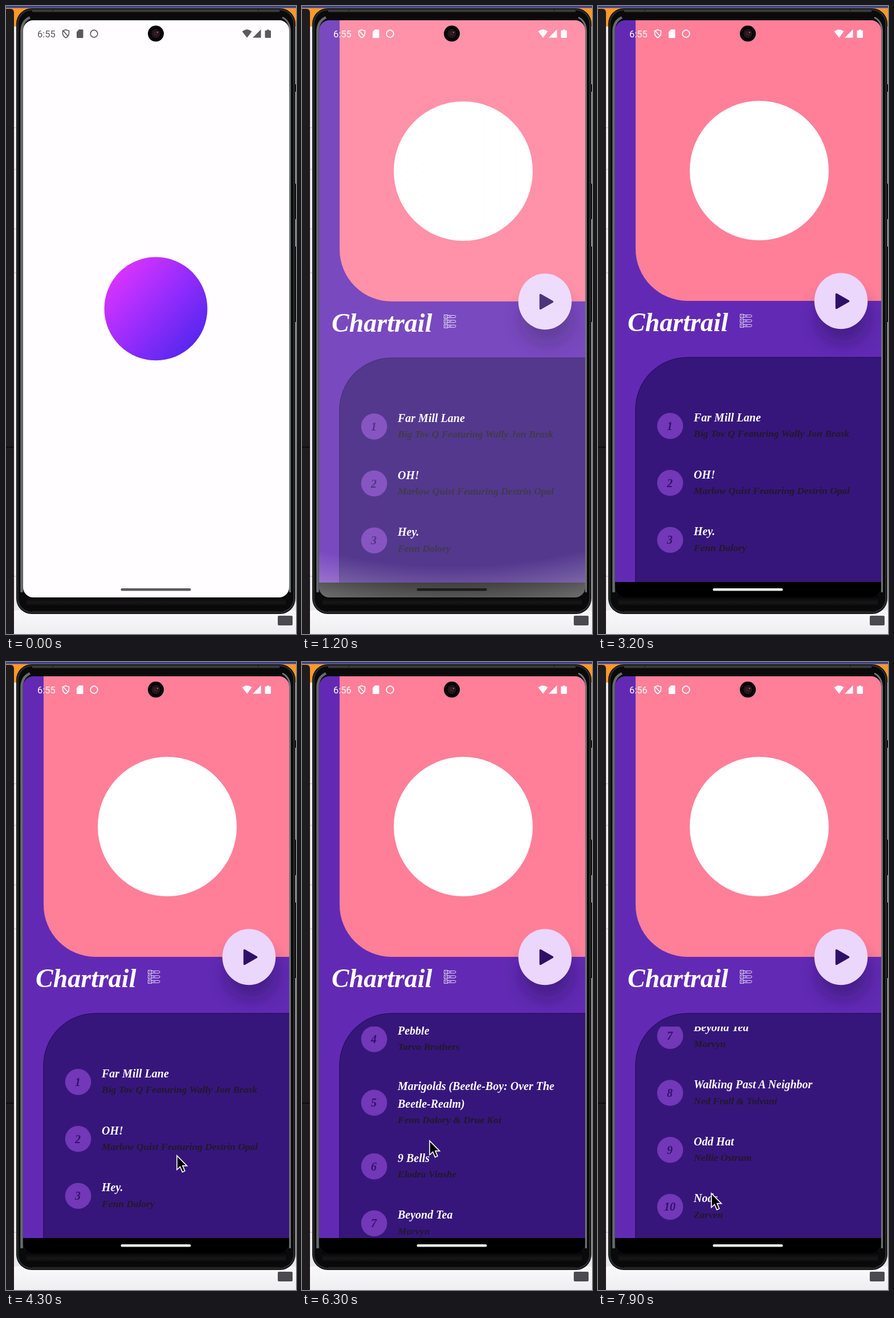
Write an HTML page that moves like this. It is 509 px wide and 1099 px high and loops after 8000 ms.

```html
<!DOCTYPE html>
<html lang="en">
<head>
<meta charset="utf-8">
<title>Song chart</title>
<style>
  html, body { margin: 0; width: 100%; height: 100%; overflow: hidden; background: #f4f4f7; }
  svg { display: block; width: 100%; height: 100%; }
  .script { font-family: "Liberation Serif", serif; font-weight: bold; font-style: italic; }
  .title { font-size: 20px; fill: #fff; }
  .artist { font-size: 17.5px; fill: #21182a; }
  .rank { font-size: 20px; fill: #340f70; text-anchor: middle; }
</style>
</head>
<body>
<svg viewBox="0 0 509 1099" preserveAspectRatio="none">
  <defs>
    <linearGradient id="disc" x1=".12" y1=".15" x2=".9" y2=".85">
      <stop offset="0" stop-color="#d933ff"/>
      <stop offset=".5" stop-color="#962cfc"/>
      <stop offset="1" stop-color="#5427ee"/>
    </linearGradient>
    <radialGradient id="reveal" gradientUnits="userSpaceOnUse" cx="263" cy="25" r="1">
      <stop id="inner" offset=".8" stop-color="#fffdff"/>
      <stop offset="1" stop-color="#fffdff"/>
    </radialGradient>
    <linearGradient id="desk" x1="0" y1="0" x2="0" y2="1">
      <stop offset="0" stop-color="#fafafc"/>
      <stop offset="1" stop-color="#eeeef2"/>
    </linearGradient>
    <linearGradient id="chin" x1="0" y1="0" x2="0" y2="1">
      <stop offset="0" stop-color="#020202"/>
      <stop offset=".6" stop-color="#171718"/>
      <stop offset="1" stop-color="#050505"/>
    </linearGradient>
    <filter id="soft" x="-80%" y="-80%" width="260%" height="260%">
      <feGaussianBlur stdDeviation="15"/>
    </filter>
    <clipPath id="screen"><rect x="30" y="25" width="467" height="1010" rx="18"/></clipPath>
    <clipPath id="window"><rect x="66" y="638" width="431" height="370"/></clipPath>
  </defs>

  <!-- desktop -->
  <rect width="509" height="1099" fill="#e9e9ec"/>
  <rect y="1058" width="509" height="41" fill="url(#desk)"/>
  <rect width="509" height="36" fill="#f79a2b"/>
  <rect width="509" height="3.5" fill="#38438f"/>
  <path d="M14 213h5M14 286h5M14 390h5M14 467h5M14 998h5" stroke="#b9b9bd"/>
  <path d="M0 5H8Q14 5 14 12V1099H0Z" fill="#1f1c20"/>
  <path d="M0 772H14" stroke="#0c0b0d" stroke-width="2"/>
  <rect x="477" y="1067" width="26" height="17" rx="2" fill="#4a4a50"/>

  <!-- phone body -->
  <rect x="505" y="137" width="4" height="13" fill="#141414"/>
  <rect x="505" y="311" width="4" height="62" fill="#141414"/>
  <rect x="505" y="421" width="4" height="132" fill="#141414"/>
  <rect x="18" y="4" width="490" height="1060" rx="27" fill="#0a0a0b"/>
  <rect x="20.5" y="6.5" width="485" height="1055" rx="25" fill="none" stroke="#2b2d2d" stroke-width="2.5"/>
  <path d="M46 8.500H480" stroke="#3a3b3c" stroke-width="4"/>
  <path d="M82 5v7M443 5v7" stroke="#1b1b1b"/>
  <path d="M27.500 1026V44Q28 26 42 20" fill="none" stroke="#676a6b" stroke-width="4.500"/>
  <path d="M498.500 1026V44Q498 26 485 20" fill="none" stroke="#6f7273" stroke-width="3"/>
  <rect x="36" y="1032" width="455" height="20" fill="url(#chin)"/>
  <path d="M46 1060.500H480" stroke="#252526" stroke-width="3"/>

  <g clip-path="url(#screen)">
    <rect x="30" y="25" width="467" height="1010" fill="#622ab4"/>
    <g id="app">
      <path d="M66 5H497V516H157A91 91 0 0 1 66 425Z" fill="#ff7f99"/>
      <circle cx="283" cy="288" r="122" fill="#fff"/>
      <ellipse cx="430" cy="546" rx="46" ry="45" fill="#260c58" opacity=".46" filter="url(#soft)"/>
      <ellipse cx="426.500" cy="516.200" rx="46.800" ry="49" fill="#ebd6fc"/>
      <path d="M418.500 504.500V528.500L439.500 516.500Z" fill="#2f1067" stroke="#2f1067" stroke-width="3.500" stroke-linejoin="round"/>
      <text class="script" x="52" y="569" font-size="46" fill="#fff">Chartrail</text>
      <g id="rows" fill="none" stroke="#e9defa"></g>
      <path d="M66 1012V706A91 91 0 0 1 157 615H500V1012Z" fill="#37167b" stroke="#2b0f66" stroke-width="1.500"/>
      <g clip-path="url(#window)"><g id="list"></g></g>
      <rect x="30" y="1008" width="467" height="27" fill="#000"/>
    </g>
    <rect x="30" y="25" width="467" height="1010" fill="url(#reveal)"/>
    <circle id="icon" cx="263" cy="529.800" r="90.500" fill="url(#disc)"/>
    <rect id="handle" x="201.500" y="1019" width="123" height="4.500" rx="2.250"/>

    <g id="status">
      <text id="clock" x="55" y="55" font-family="Roboto, sans-serif" font-size="16.500"></text>
      <path d="M105 41.500L110.500 43.500V48Q110 53 105 55.500Q100 53 99.500 48V43.500ZM100.500 43.500L109 53" fill="none" stroke="currentColor" stroke-width="1.700"/>
      <path d="M128 41H134.500Q135.500 41 135.500 42V54.500Q135.500 56 134 56H125.500Q124 56 124 54.500V45.500Z"/>
      <circle cx="154.500" cy="48.500" r="6.300" fill="none" stroke="currentColor" stroke-width="1.700"/>
      <path d="M414.500 44.500Q423 37.500 431.500 44.500L423 55.500Z"/>
      <path d="M447.500 41V55.500H433Z"/>
      <path d="M458 41.300h3.500v1.500h2.500q1 0 1 1V54.800q0 1-1 1h-8.500q-1 0-1-1V43.800q0-1 1-1h2.500z"/>
    </g>
  </g>

  <!-- camera -->
  <circle cx="263" cy="48.300" r="14" fill="#060506"/>
  <circle cx="263" cy="48.300" r="8" fill="#211519"/>
  <circle cx="263" cy="48.300" r="4.500" fill="#331b20"/>
  <circle cx="266" cy="46" r="1.300" fill="#8d5a62"/>

  <path id="cursor" d="M0 0V24.500L5.600 19.300L9.600 28.600L13.900 26.700L10 17.600H17.600Z" fill="#000" stroke="#fff" stroke-width="1.600"/>
</svg>
<script>
const LOOP = 8000;
const $ = id => document.getElementById(id);

const songs = [
  ["Far Mill Lane", "Big Tov Q Featuring Wally Jon Brask"],
  ["OH!", "Marlow Quist Featuring Destrin Opal"],
  ["Hey.", "Fenn Dalory"],
  ["Pebble", "Tarvo Brothers"],
  ["Marigolds (Beetle-Boy: Over The|Beetle-Realm)", "Fenn Dalory & Drue Koi"],
  ["9 Bells", "Elodra Vinshe"],
  ["Beyond Tea", "Morvyn"],
  ["Walking Past A Neighbor", "Ned Frall & Tolvani"],
  ["Odd Hat", "Nellie Ostrum"],
  ["Nods", "Zarven"]
];

// Each swipe drags the list with the pointer, then lets it coast.
const swipes = [
  { at: 4500, drag: 217, coast: 157 },
  { at: 6400, drag: 220, coast: 108 }
];
const DRAG = 500;

function add(parent, tag, attrs, text) {
  const el = document.createElementNS("http://www.w3.org/2000/svg", tag);
  for (const name in attrs) el.setAttribute(name, attrs[name]);
  if (text) el.textContent = text;
  parent.appendChild(el);
}

function buildList() {
  let top = 685;
  songs.forEach(([title, artist], i) => {
    const lines = title.split("|");
    const height = lines.length > 1 ? 123 : 99.7;
    const y = top + height / 2;
    const first = y - 8 - (lines.length - 1) * 14;
    const write = (kind, x, yy, text) =>
      add($("list"), "text", { class: "script " + kind, x, y: yy }, text);
    add($("list"), "circle", { cx: 126.6, cy: y, r: 22.8, fill: "#7238b7" });
    write("rank", 126, y + 7, String(i + 1));
    lines.forEach((line, n) => write("title", 168, first + n * 30.5, line));
    write("artist", 168, first + (lines.length - 1) * 30.5 + 27.5, artist);
    top += height;
  });
}

function buildRows() {
  for (let i = 0; i < 3; i++) {
    const y = 539.5 + i * 8.4;
    add($("rows"), "rect", { x: 249.5, y, width: 6, height: 6 });
    add($("rows"), "path", { d: `M256 ${y + 1}h11.500q2.500 0 2.500 2t-2.500 2h-11.500M252.500 ${y + 1.5}v3M258 ${y + 3}h4` });
  }
}

const clamp = x => Math.max(0, Math.min(1, x));
const span = (t, from, to) => clamp((t - from) / (to - from));
const linear = x => x;
const smooth = x => x * x * (3 - 2 * x);
const easeOut = x => 1 - (1 - x) ** 2;

// Interpolates [time, value] stops.
function track(t, stops, ease = smooth) {
  let value = stops[0][1];
  for (let i = 1; i < stops.length; i++) {
    const [t0, v0] = stops[i - 1], [t1, v1] = stops[i];
    if (t >= t0) value = v0 + (v1 - v0) * ease(span(t, t0, t1));
  }
  return value;
}

function scrollAt(t) {
  return swipes.reduce((sum, { at, drag, coast }) => {
    const release = at + DRAG;
    const glide = 2 * coast * DRAG / drag; // coasting starts at the drag speed
    return sum + drag * span(t, at, release) + coast * easeOut(span(t, release, release + glide));
  }, 0);
}

function pointerAt(t) {
  const x = track(t, [[3600, 335], [4300, 300], [4500, 300], [5000, 296], [5250, 296], [6050, 224], [6400, 224], [6900, 218], [7100, 218], [7750, 199]]);
  const rest = track(t, [[3600, 1040], [4300, 864], [5250, 864], [6050, 838], [7100, 838], [7750, 930]]);
  const lift = swipes.reduce((sum, { at, drag }) =>
    sum + drag * (span(t, at, at + DRAG) - smooth(span(t, at + 750, at + 1450))), 0);
  return [x, rest - lift];
}

function render(t) {
  const dark = t < 900;

  // The splash clears outward from the top while the app slides up.
  const p = span(t, 860, 1260);
  $("reveal").setAttribute("r", 1 + 1220 * easeOut(p));
  $("inner").setAttribute("stop-opacity", 1 - p);
  $("reveal").lastElementChild.setAttribute("stop-opacity", p < 1 ? 1 : 0);
  $("app").setAttribute("transform", `translate(0 ${12 * (1 - p) ** 1.3})`);
  $("icon").setAttribute("opacity", 1 - span(t, 860, 1000));

  const bar = dark ? 92 : Math.round(track(t, [[1200, 28], [2200, 205], [3000, 236]], linear));
  $("handle").setAttribute("fill", `rgb(${bar},${bar},${bar})`);

  const ink = dark ? "#5b595c" : "#fff";
  $("status").setAttribute("fill", ink);
  $("status").setAttribute("color", ink);
  $("clock").textContent = t < 5600 ? "6:55" : "6:56";

  $("list").setAttribute("transform", `translate(0 ${-scrollAt(t)})`);
  $("cursor").setAttribute("transform", `translate(${pointerAt(t)})`);
  $("cursor").setAttribute("visibility", t < 3600 ? "hidden" : "visible");
}

buildList();
buildRows();
const start = performance.now();
function tick() {
  render((performance.now() - start) % LOOP);
  requestAnimationFrame(tick);
}
tick();
</script>
</body>
</html>
```
